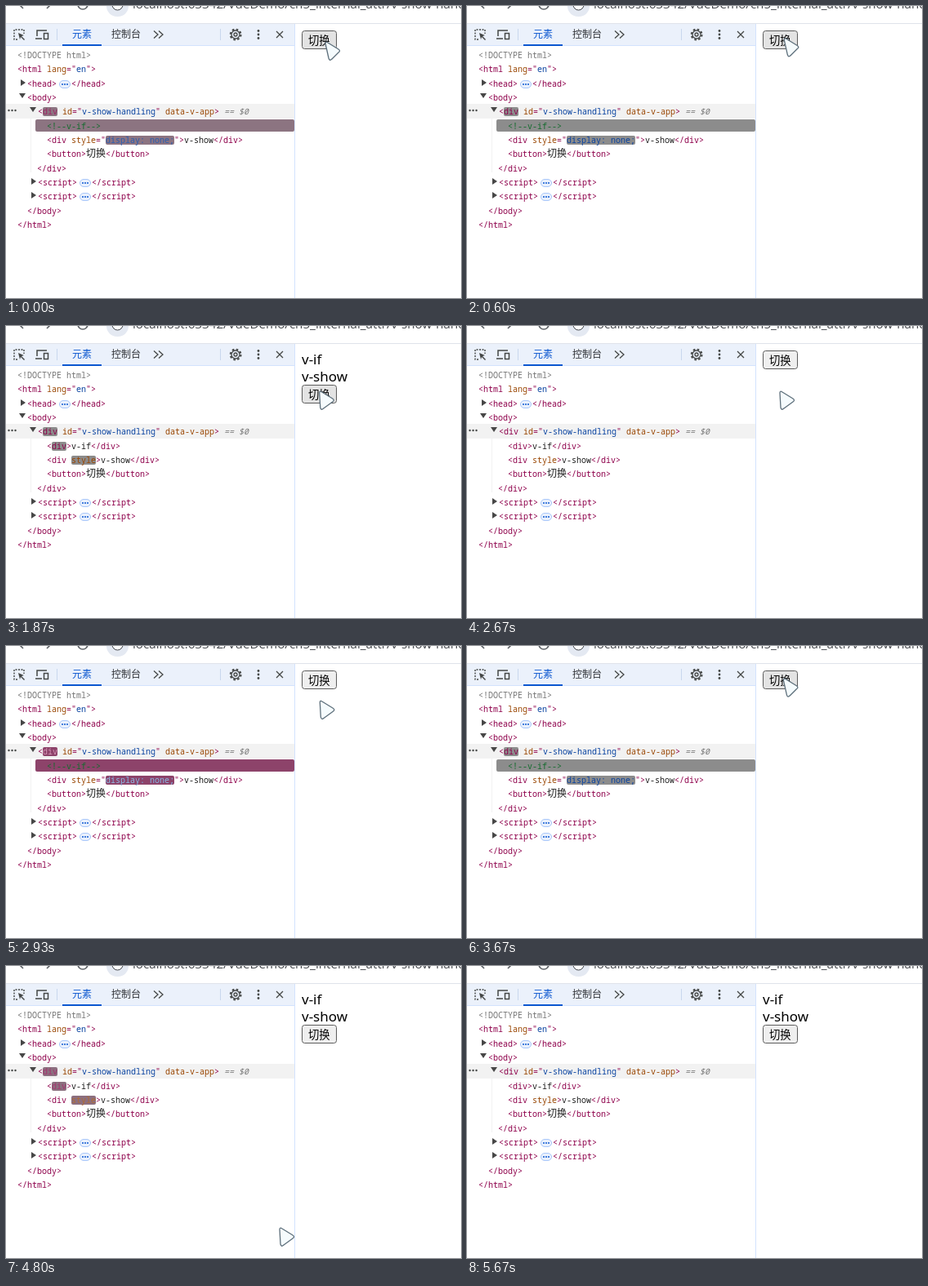
Recreate the animation shown at these times as an HTML page with a canvas. Size 557 by 358 pixels, loop 6070 ms.

```html
<!DOCTYPE html>
<html lang="zh">
<head>
<meta charset="utf-8">
<style>
html, body { margin: 0; width: 100%; height: 100%; overflow: hidden; background: #fff }
canvas { display: block }
</style>
</head>
<body>
<canvas width="557" height="358"></canvas>
<script>
const ctx = document.querySelector('canvas').getContext('2d');
const LOOP = 6070, STEP = 200 / 3;
const MONO = '10px "Noto Sans Mono", monospace';
const cjk = size => `${size}px "Noto Sans CJK SC", sans-serif`;
const ICON = '#444746', BLUE = '#0b57d0';

// Token colours: tag, attribute, value, comment, plain, grey, Chinese text
const COLORS = {
  t: '#8e004b', a: '#994500', v: '#0842a0', m: '#146c2e',
  x: '#1f1f1f', g: '#757575', c: '#1f1f1f'
};

// Clicks on the button; the tree follows the page after a delay
const TOGGLES = [-500, 1060, 2590, 4330];
const TREE_DELAY = 100, PRESS = 140, FLASH = 1240;

// Pointer: time, x, y
const POINTER = [
  [0, 391, 44], [670, 388, 39], [1130, 388, 38], [1600, 384, 80], [2670, 383, 80],
  [3270, 387, 41], [4270, 388, 38], [4800, 335, 321], [5130, 327, 362]
];

// Markup rows: "~" plus a token letter; a capital marks a freshly changed part
const scriptRow = [39, '~t<script>~p~t<\/script>', 'right'];
const rows = shown => [
  [14, '~g<!DOCTYPE html>'],
  [14, '~t<html ~alang~t="~ven~t">'],
  [26, '~t<head>~p~t</head>', 'right'],
  [26, '~t<body>', 'down'],
  [39, '~t<~Tdiv~t ~aid~t="~vv-show-handling~t" ~adata-v-app~t>~g == $0', 'down'],
  [50, shown ? '~t<~Tdiv~t>~xv-if~t</div>' : '~M<\!--v-if-->'],
  [50, shown ? '~t<div ~Astyle~t>~xv-show~t</div>'
             : '~t<div ~astyle~t="~Vdisplay: none;~t">~xv-show~t</div>'],
  [50, '~t<button>~c切换~t</button>'],
  [38, '~t</div>'],
  scriptRow, scriptRow,
  [26, '~t</body>'],
  [14, '~t</html>']
];

const clamp = v => Math.max(0, Math.min(1, v));
const mix = (a, b, k) => a.map((v, i) => v + (b[i] - v) * k);

function pointerAt(t) {
  const i = POINTER.findIndex(p => p[0] > t);
  if (i < 0) return POINTER.at(-1).slice(1);
  const a = POINTER[i - 1], b = POINTER[i];
  return mix(a, b, (t - a[0]) / (b[0] - a[0])).slice(1);
}

// Turns from crimson to grey, then fades out
function glow(age) {
  const grey = 1 - (1 - clamp(age / 900)) ** 3;
  const fade = clamp((age - 1130) / (FLASH - 1130));
  const c = mix([142, 0, 75], [140, 140, 140], grey).map(Math.round);
  return `rgba(${c}, ${1 - fade})`;
}

function rect(x, y, w, h, fill) {
  ctx.fillStyle = fill;
  ctx.fillRect(x, y, w, h);
}

function round(x, y, w, h, r, fill, line) {
  ctx.beginPath();
  ctx.roundRect(x, y, w, h, r);
  ctx.fillStyle = fill;
  ctx.fill();
  if (line) { ctx.strokeStyle = line; ctx.lineWidth = 1; ctx.stroke(); }
}

function text(s, x, y, font, color) {
  ctx.font = font;
  ctx.fillStyle = color;
  ctx.fillText(s, x, y);
}

function path(d, line, width = 1.3, fill) {
  const p = new Path2D(d);
  if (fill) { ctx.fillStyle = fill; ctx.fill(p); }
  if (line) { ctx.strokeStyle = line; ctx.lineWidth = width; ctx.stroke(p); }
}

function dots(x, y, dx, dy, r, color) {
  ctx.fillStyle = color;
  for (let i = -1; i < 2; i++) {
    ctx.beginPath();
    ctx.arc(x + i * dx, y + i * dy, r, 0, 7);
    ctx.fill();
  }
}

function browserBar() {
  path('M16 -2l5 5M50 3l6 -6M88 -2a6 6 0 0 0 12 0', '#5f6368', 1.7);
  round(123, -14, 27, 27, 13, '#e4e9f2');
  round(130, -8, 13, 13, 6.5, '#fff', '#474a4f');
  text('localhost:63342/VueDemo/ch5_internal_attr/v-show-handling.html', 155, 3,
    '15.2px "Open Sans", sans-serif', '#474a4f');
  rect(0, 21, 557, 1, '#dfe3ea');
}

function toolsBar() {
  rect(0, 22, 353, 27, '#ebf1fb');
  rect(0, 48, 353, 1, '#d3e3fd');
  ctx.setLineDash([2, 1.5]);
  path('M14 41h-4v-12h12v5', ICON, 1.4);
  ctx.setLineDash([]);
  path('M15 33l7 3 -3 1 4 4 -1 1 -4 -4 -1 3z', null, 0, ICON);
  path('M38 37v-7h12M36 40h8M46.5 33.5h5v7h-5z', ICON, 1.5);
  rect(62, 28, 1, 14, '#c9d7ee');
  rect(262, 28, 1, 14, '#c9d7ee');
  text('元素', 81, 39, cjk(12), BLUE);
  text('控制台', 129, 39, cjk(12), '#303236');
  rect(69, 47, 48, 2, BLUE);
  path('M181 30.5l5 4.5 -5 4.5M187 30.5l5 4.5 -5 4.5', ICON);
  ctx.setLineDash([2.6, 2.4]);
  path('M287.5 35a6.4 6.4 0 1 1 -12.8 0a6.4 6.4 0 1 1 12.8 0', ICON, 2);
  ctx.setLineDash([]);
  path('M286 35a5 5 0 1 1 -10 0a5 5 0 1 1 10 0M283 35a2 2 0 1 1 -4 0a2 2 0 1 1 4 0', ICON);
  dots(309, 35, 0, 4.5, 1.4, ICON);
  path('M331 31l8 8M339 31l-8 8', ICON);
}

function pill(x, y) {
  round(x + 3.5, y - 3.5, 13, 9, 4.5, '#eaf1fd', '#a8c7fa');
  dots(x + 10, y + 1, 3, 0, 1, BLUE);
}

function tree(shown, age) {
  rect(0, 120, 353, 18, '#f2f2f2');
  rect(30, 138, 1, 66, '#f2f2f2');
  dots(7.5, 128, 4, 0, 1.2, ICON);
  rows(shown).forEach(([x, line, arrow], i) => {
    const y = Math.round(60 + i * 17.33);
    if (arrow === 'right') path(`M${x - 8} ${y - 5}l6 4 -6 4z`, null, 0, '#474747');
    if (arrow === 'down') path(`M${x - 10} ${y - 5}h8l-4 6z`, null, 0, '#474747');
    for (const part of line.split('~').slice(1)) {
      const type = part[0].toLowerCase(), s = part.slice(1);
      if (type === 'p') {
        pill(x, y);
        x += 18;
        continue;
      }
      const hot = age < FLASH && part[0] !== type;
      const w = s.length * (type === 'c' ? 12 : 6);
      const font = type === 'c' ? cjk(12) : (s.includes('$0') ? 'italic ' : '') + MONO;
      if (hot && type === 'm') round(36, 139, 317, 15, 2, glow(age));
      else if (hot) round(x, y - 5, w, 11, 2, glow(age));
      text(s, x, y + 4, font, COLORS[type]);
      if (hot && type !== 'm') {
        text(s, x, y + 4, font, `rgba(255, 255, 255, ${1 - clamp(age / 480)})`);
      }
      x += w;
    }
  });
  rect(353, 22, 1, 336, '#d3e3fd');
}

function page(shown, pressed, [px, py]) {
  const top = shown ? 72 : 30;
  const hover = px > 362 && px < 405 && py > top && py < top + 23;
  if (shown) {
    const font = '17px "Noto Sans", sans-serif';
    text('v-if', 362, 47, font, '#000');
    text('v-show', 362, 68, font, '#000');
  }
  const fill = pressed ? '#f5f5f5' : hover ? '#e3e3e3' : '#efefef';
  round(362.5, top + .5, 42, 22, 3, fill, '#5c5c5c');
  text('切换', 370, top + 17, cjk(13.33), '#000');
}

function pointer([x, y], shown) {
  ctx.save();
  ctx.translate(x, y);
  ctx.lineJoin = 'round';
  if (shown && x > 386 && y < 70) {
    path('M-5 -18.5h12l-5 7M-3 -13l5 -5M0 -12l6 -6', '#7d858c', 1);
    path('M-1.5 -9.5h3v18h-3z', '#6f8296', 1, '#eef6fb');
  } else {
    const foot = y < 60 ? 5 : 2;
    path(`M0 2Q0 -1 3 1L16 9Q19 11 16 13L${foot + 3} 21Q${foot} 24 ${foot - 1} 20Z`,
      '#5d6f7b', 1.3, '#f5fbfd');
  }
  ctx.restore();
}

function draw(now) {
  const t = Math.floor((now % LOOP) / STEP + .01) * STEP;
  const lastBefore = time => TOGGLES.findLastIndex(c => c <= time);
  const shown = lastBefore(t) % 2 === 1;
  const pressed = lastBefore(t + PRESS) > lastBefore(t);
  const change = lastBefore(t - TREE_DELAY);
  const at = pointerAt(t);
  rect(0, 0, 557, 358, '#fff');
  browserBar();
  toolsBar();
  tree(change % 2 === 1, t - TREE_DELAY - TOGGLES[change]);
  page(shown, pressed, at);
  pointer(at, shown);
}

const start = performance.now();
function tick() {
  draw(performance.now() - start);
  requestAnimationFrame(tick);
}
tick();
</script>
</body>
</html>
```
